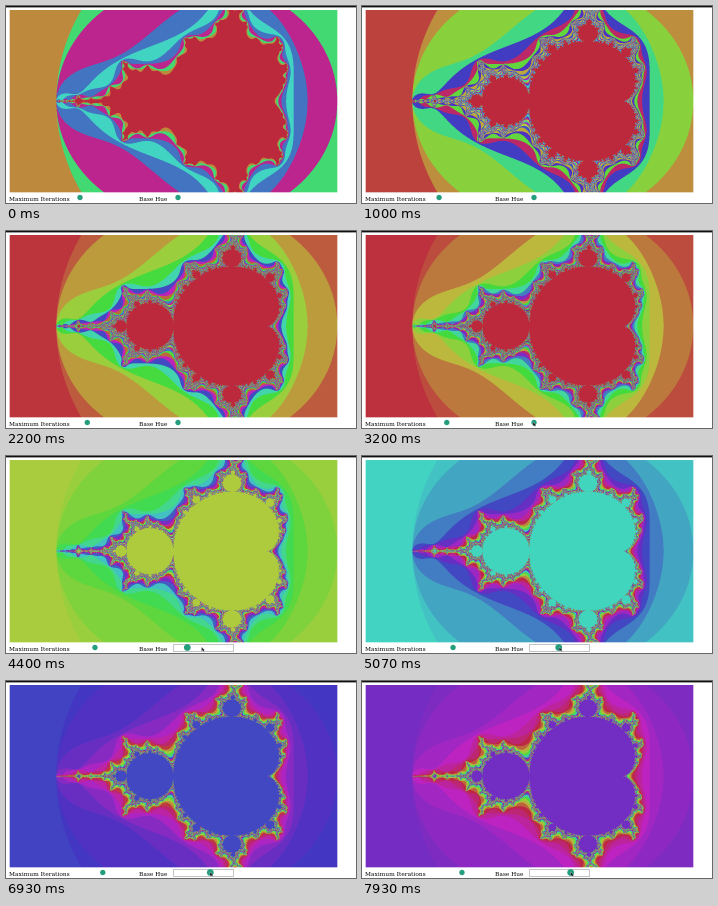
Recreate the animation shown at these times as a matplotlib script. Size 350 by 197 pixels, loop 8 s.

```python
import numpy as np
import matplotlib.pyplot as plt
from matplotlib.animation import FuncAnimation
from matplotlib.patches import Circle, Polygon, Rectangle

W, H, DPI = 350, 197, 100
FRAMES, LOOP = 120, 8000
SS = 3                               # samples per pixel side
X0, X1, Y0, Y1 = 3.5, 331.3, 4, 186.3  # fractal canvas on the stage
COLS, ROWS = (3, 332), (4, 187)      # whole pixels it touches
KNOB_Y = 191.5
TEAL = "#259e7e"


def samples(span):
    return span[0] + (np.arange((span[1] - span[0]) * SS) + 0.5) / SS


def escape_counts(limit):
    """Steps each point needs to leave |z| <= 2; 0 outside the canvas."""
    x, y = np.meshgrid(samples(COLS), samples(ROWS))
    inside = (x > X0) & (x < X1) & (y > Y0) & (y < Y1)
    count = np.where(inside, limit, 0).ravel()
    alive = np.flatnonzero(inside)
    c = (-2.5 + 3.5 * (x - X0) / (X1 - X0)
         + 1j * (2 * (y - Y0) / (Y1 - Y0) - 1)).ravel()[alive]
    z = np.zeros_like(c)
    for i in range(1, limit + 1):
        z = z * z + c
        keep = z.real ** 2 + z.imag ** 2 <= 4
        count[alive[~keep]] = i
        alive, z, c = alive[keep], z[keep], c[keep]
    return count.reshape(x.shape)


def hue_to_rgb(hue):
    """Pure hues, softened to a muted range."""
    phase = (hue[:, None] / 60 + np.array([0, 4, 2])) % 6
    pure = np.clip(np.abs(phase - 3) - 1, 0, 1)
    rgb = np.array([66, 58, 62]) + pure * np.array([122, 161, 132])
    rgb[:, 1] -= 17 * pure[:, 0] + 6 * pure[:, 2]
    return rgb / 255


def iteration_limit(t):
    return int(round(np.interp(t, [0, 1, 4.4, 7.93], [10, 38, 146, 248])))


def base_hue(t):
    return np.interp(t, [4.34, 4.4, 4.6, 5.8, 7.93], [0, 67, 165, 199, 266])


def cursor_tip(t):
    """Rises from below the stage, then drags to the right."""
    x = np.interp(t, [2.65, 3.1, 3.6, 4.4, 5.8, 7.93], [166, 171, 171, 195.5, 199, 209])
    return x, max(200 - 21 * (t - 2.65), 191)


MAX_LIMIT = iteration_limit(LOOP / 1000)
COUNTS = escape_counts(MAX_LIMIT)


def render(limit, base):
    i = np.minimum(np.arange(MAX_LIMIT + 1), limit)
    colors = hue_to_rgb(base + 360 * i ** 2 / limit)
    colors[0] = 1
    return sum(colors[COUNTS[a::SS, b::SS]]
               for a in range(SS) for b in range(SS)) / SS ** 2


fig = plt.figure(figsize=(W / DPI, H / DPI), dpi=DPI, facecolor="white")
ax = fig.add_axes([0, 0, 1, 1])
ax.axis("off")

picture = ax.imshow(np.ones((ROWS[1] - ROWS[0], COLS[1] - COLS[0], 3)),
                    extent=(*COLS, *ROWS[::-1]),
                    interpolation="nearest", aspect="auto")
ax.set_xlim(0, W)
ax.set_ylim(H, 0)

ax.add_patch(Rectangle((0, 0), W, 1.4, fc="#101010", lw=0, snap=False))
for x, label in ((3, "Maximum Iterations"), (133.3, "Base Hue")):
    ax.text(x, 195, label, family="DejaVu Serif", size=5.83 * 72 / DPI,
            color="black", va="baseline")

focus = ax.add_patch(Rectangle((167, 188), 60, 7.2, fc="white", ec="#b8b8b8", lw=0.6))
limit_knob, hue_knob = (ax.add_patch(Circle((x, KNOB_Y), 2.7, fc=TEAL, lw=0))
                        for x in (74, 172))
arrow = np.array([(0, 0), (0, 4.2), (1.2, 3.3), (2, 4.7), (3, 3)])
cursor = ax.add_patch(Polygon(arrow, closed=True, fc="#101820", ec="white", lw=0.15))


def draw(k):
    t = k * LOOP / FRAMES / 1000
    limit, base = iteration_limit(t), base_hue(t)
    dragging = t > 3.6
    picture.set_data(render(limit, base))
    limit_knob.center = (74 + 0.11 * (limit - 10), KNOB_Y)
    hue_knob.center = (172 + 50 * base / 360, KNOB_Y)
    hue_knob.set_radius(3.4 if dragging else 2.7)
    focus.set_visible(dragging)
    cursor.set_xy(arrow + cursor_tip(t))
    return picture, limit_knob, hue_knob, focus, cursor


anim = FuncAnimation(fig, draw, frames=FRAMES, interval=LOOP / FRAMES,
                     repeat=True, repeat_delay=0, blit=False)
plt.show()
```
